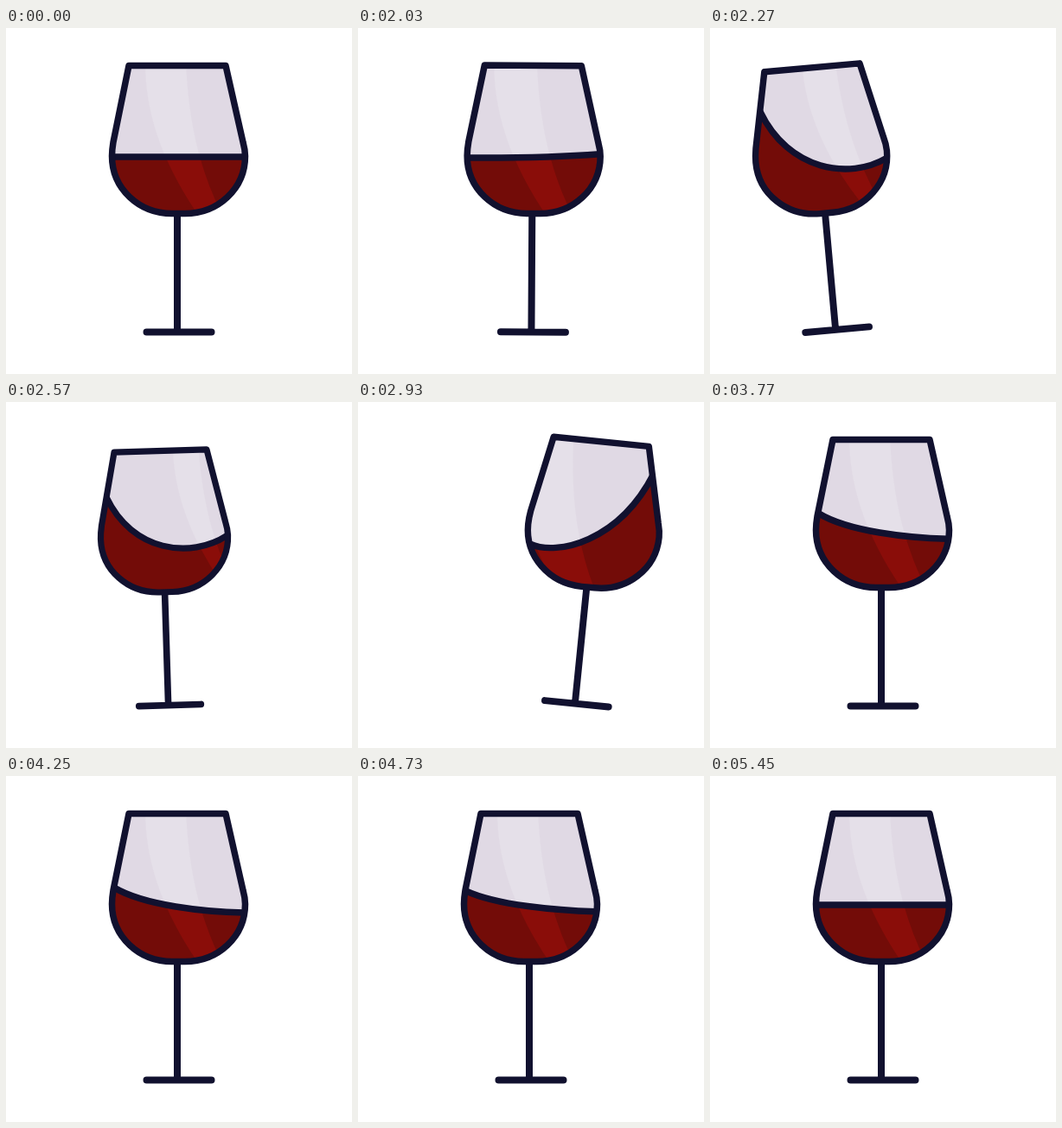
Write an HTML page that moves like this. It is 400x400 px and loops after 5480 ms.

```html
<!DOCTYPE html>
<html lang="en">
<head>
<meta charset="utf-8">
<title>Wine swirl</title>
<style>
  html, body { margin: 0; height: 100%; overflow: hidden; background: #fff; }
  svg { display: block; width: 100vw; height: 100vh; }
  .line { fill: none; stroke: #11112f; stroke-width: 7.5; stroke-linecap: round; stroke-linejoin: round; }
  .thick { stroke-width: 8; }
</style>
</head>
<body>
<svg viewBox="0 0 400 400">
  <defs>
    <path id="bowl" d="M142 43.5H254L274 132Q276.5 141 276.5 148C276.5 186 245 214.5 207 214.5H192C154 214.5 122.5 186 122.5 148Q122.5 141 124 132Z"/>
    <path id="shine"/>
    <path id="wine"/>
    <clipPath id="inBowl"><use href="#bowl"/></clipPath>
    <clipPath id="inWine"><use href="#wine"/></clipPath>
  </defs>
  <g id="glass">
    <g clip-path="url(#inBowl)">
      <use href="#bowl" fill="#e0d9e4"/>
      <use href="#shine" fill="#e5e0e9"/>
      <use href="#wine" fill="#730c08"/>
      <g clip-path="url(#inWine)"><use href="#shine" fill="#8a0d09"/></g>
      <path id="surface" class="line"/>
    </g>
    <path class="line thick" d="M198 216V350M162.5 351.5H237.5"/>
    <use href="#bowl" class="line"/>
  </g>
</svg>
<script>
const LOOP = 5480, START = 2030, STEP = 30;
const TURN = 2 * Math.PI, SWIRL = 1040, MIDDLE = 2600, SLOSH = 480, REST = 149;
const el = id => document.getElementById(id);

const progress = (t, from, span) => Math.min(1, Math.max(0, (t - from) / span));
const ease = (t, from, span) => {
  const u = progress(t, from, span);
  return u * u * (3 - 2 * u);
};

// The glass travels once round an ellipse, seen from the front
function swirl(t) {
  const power = ease(t, 1985, 190) * (1 - ease(t, 3070, 160));
  const angle = TURN * (t - MIDDLE) / SWIRL;
  const side = lag => power * Math.sin(angle - lag);
  return {
    x: 58 * side(0),
    tilt: 6 * side(0.12),
    size: 1 - power * (0.0216 + 0.0234 * Math.cos(angle)),
    shine: -45 * side(0.745)
  };
}

// Surface heights: left end, two curve handles, right end
function liquid(t) {
  const power = ease(t, 1985, 250) * (1 - 0.69 * ease(t, 2950, 820))
    * (1 - progress(t, 3770, 1680) ** 3);
  // The wave follows the glass, then sloshes at its own faster pace
  const turns = Math.max((t - 2921) / SWIRL, (t - 3050) / SLOSH);
  const wave = -48 * power * Math.cos(TURN * turns);
  const sag = power ** 1.3;
  const rim = REST - 26 * sag, belly = REST + 21 * sag;
  return [rim - wave, belly - wave / 4, belly + wave / 4, rim + wave];
}

// Left inner side of the bowl at a given height
function wall(y) {
  if (y < 140) return 142 - (y - 44) * 0.2;
  const k = (y - 148) / 66.5;
  return 199.5 - 77 * Math.sqrt(Math.max(0, 1 - k * k));
}

function draw(t) {
  const { x, tilt, size, shine } = swirl(t);
  const y = -x * x / 1100 - (1 - size) * 18;
  el('glass').setAttribute('transform',
    `translate(${199.5 + x} ${351 + y}) rotate(${tilt}) scale(${size}) translate(-199.5 -351)`);

  const [a, b, c, d] = liquid(t);
  const top = `M${wall(a)} ${a}C160 ${b} 230 ${c} ${398.5 - wall(d)} ${d}`;
  el('surface').setAttribute('d', top);
  el('wine').setAttribute('d', `${top}H300V230H100V${a}Z`);

  const l = shine * 1.45, r = shine;
  el('shine').setAttribute('d',
    `M${161 + l} 40C${161 + l} 90 ${175 + l} 147 ${222 + l} 216H${250 + r}C${222 + r} 160 ${211 + r} 105 ${208 + r} 40Z`);
}

let began;
function tick(now) {
  began ??= now;
  const t = (now - began) % LOOP;
  draw(t < START ? 0 : START + Math.floor((t - START) / STEP) * STEP);
  requestAnimationFrame(tick);
}
draw(0);
requestAnimationFrame(tick);
</script>
</body>
</html>
```
